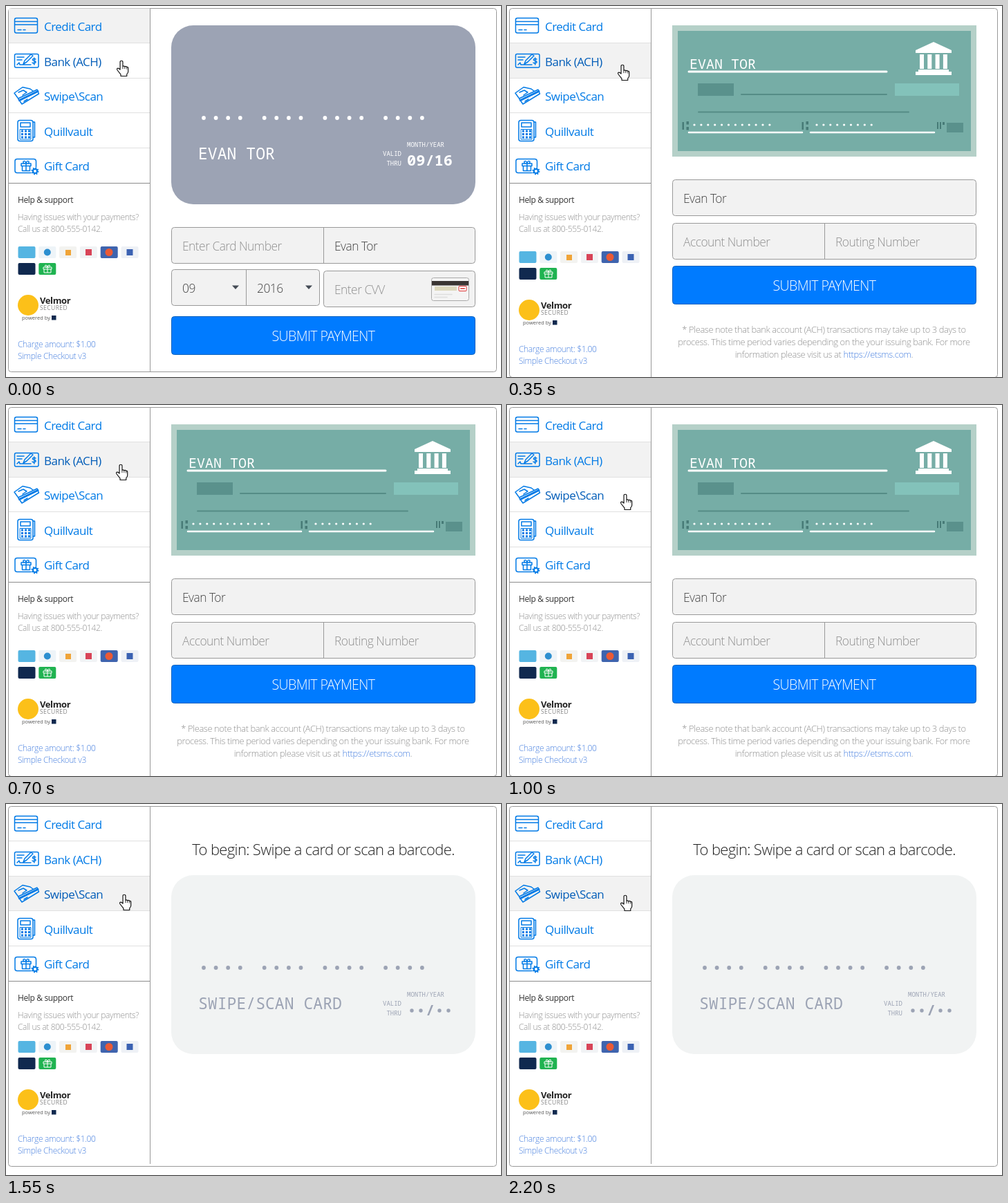
These frames come from a looping animation (716x537 px, 2250 ms). An HTML page:

```html
<!DOCTYPE html>
<html lang="en">
<head>
<meta charset="utf-8">
<title>Payment form</title>
<style>
  html, body { margin: 0; width: 100%; height: 100%; overflow: hidden; background: #fff; }
  svg { display: block; width: 716px; height: 537px; }
  text { font: 300 12px "Open Sans", "Noto Sans", sans-serif; letter-spacing: -.03em; fill: #909090; }
  .menu { font-size: 17px; font-weight: 400; fill: #007ae6; }
  .hover { fill: #005cb8; }
  .field { font-size: 17.4px; }
  .value { fill: #444; }
  .submit { font-size: 19.5px; fill: #fff; }
  .title { font-size: 22px; fill: #222; }
  .note { font-size: 12.9px; }
  .help { font-weight: 400; fill: #333; }
  .link { fill: #4c83e0; }
  .mid { text-anchor: middle; }
  .end { text-anchor: end; }
  .mono { font-family: "Noto Sans Mono", "DejaVu Sans Mono", monospace; font-weight: 500; letter-spacing: 0; fill: inherit; }
  .name { font-size: 23.1px; }
  .payer { font-size: 20px; }
  .tiny { font-size: 9px; }
  .date { font-size: 22px; font-weight: 700; }
  .brand { font-size: 13px; font-weight: 700; fill: #222; }
  .secured { font-size: 8.5px; font-weight: 400; letter-spacing: .05em; fill: #888; }
  .powered { font-size: 7.5px; font-weight: 400; letter-spacing: 0; fill: #555; }
  .icons { fill: none; stroke: #007ae6; stroke-width: 1.5; stroke-linejoin: round; stroke-linecap: round; }
</style>
</head>
<body>
<svg viewBox="0 0 716 537">
  <rect id="frame" x="3.5" y="3.5" width="706" rx="4" fill="#fff" stroke="#999"/>
  <rect id="active" x="4" width="204" height="50" fill="#f2f2f2"/>
  <path d="M4 53.5H208M4 104.5H208M4 154.5H208M4 205.5H208" stroke="#e0e0e0"/>
  <path d="M4 256.5H208" stroke="#8c8c8c"/>
  <path id="divider" stroke="#999"/>

  <g class="icons">
    <rect x="12.5" y="17.5" width="33" height="21.5" rx="2.5"/>
    <path d="M13 22.5H45M13 27H45M17 34.500H22M25 34.500H28"/>
    <rect x="12.5" y="69.5" width="34.5" height="19.5" rx="2"/>
    <path d="M16 74H26M16 78H23M16 85L19 82 20 85H36M25 84L27 79 36 70 39 72 30 81Z"/>
    <path d="M43 77Q38 75 38.5 78.5 43.5 79 43 82 40 84 38 82M40.8 75V85"/>
    <path d="M12 126L24 117.500 35 120 39 123M12 126L17 133M18 125L25 122 30 125 24 129"/>
    <path d="M17.500 134L45 121 47.500 127 23 142Z"/>
    <path d="M19.500 136.500L46 123.500" stroke-width="3"/>
    <path d="M26 138L31 135"/>
    <rect x="17" y="165.5" width="22" height="30" rx="3"/>
    <path d="M39 168H41.500V190H39"/>
    <rect x="21" y="169" width="14" height="6"/>
    <path d="M22 181H35M22 185.500H35M22 190H35" stroke-width="3" stroke-dasharray="3 2" stroke-linecap="butt"/>
    <path d="M20.5 178.5H36V193H20.5Z" stroke-width="1"/>
    <path d="M36 241.5H16Q13 241.5 13 238.5V224.5Q13 221.5 16 221.5H40Q43.5 221.5 43.5 225V233"/>
    <path d="M22 228H36V231.5H22ZM23.5 231.5V238.5H34.5V231.5M29 228V238.5M29 228Q24 228 25 225 28 223 29 228 30 223 33 225 34 228 29 228"/>
    <circle cx="42" cy="239" r="3" stroke-width="2"/>
    <circle cx="42" cy="239" r="4.5" stroke-width="2" stroke-dasharray="1.8 1.7" stroke-linecap="butt"/>
  </g>
  <g id="menu"></g>
  <g id="help"></g>
  <g id="support"></g>
  <g id="pages"></g>

  <g id="hand">
    <g transform="translate(-1 -.3) scale(.97 .95)" fill="#fff" stroke="#111" stroke-width="1.2" stroke-linejoin="round">
      <path d="M-2 13V1.5Q-2-.5 0-.5T2 1.5V8Q3.5 6.8 5 8.5 6.7 7.5 8 9.2 10 8.5 10 11V16Q10 18 8 20V23H-1V20.5L-6 14Q-7.5 11.5-5.5 11-4 10.5-2 13Z"/>
      <path d="M2 8V12M5 8.5V12M8 9.2V12.5" fill="none" stroke-width=".9"/>
    </g>
  </g>
  <path id="arrow" d="M0 0V15.5L3.6 12.2 6 18 8.5 17 6 11.4H10.8Z" fill="#fff" stroke="#111" stroke-linejoin="round"/>
</svg>
<script>
const $ = id => document.getElementById(id);
const text = (x, y, cls, s) => `<text x="${x}" y="${y}" class="${cls}">${s}</text>`;
const rect = (x, y, w, h, fill, rx = 0) =>
  `<rect x="${x}" y="${y}" width="${w}" height="${h}" rx="${rx}" fill="${fill}"/>`;
const circle = (x, y, r, fill) => `<circle cx="${x}" cy="${y}" r="${r}" fill="${fill}"/>`;
const line = (x1, x2, y, color, w) =>
  `<path d="M${x1} ${y}H${x2}" stroke="${color}" stroke-width="${w}" stroke-linecap="round"/>`;
const dots = (n, x, y, step, r, fill) =>
  Array.from({ length: n }, (_, i) => circle(x + i * step, y, r, fill)).join("");
const box = (x, y, w, split) =>
  `<rect x="${x}" y="${y}" width="${w}" height="52" rx="4" fill="#f2f2f2" stroke="#999"/>` +
  (split ? `<path d="M${split} ${y}v52" stroke="#999"/>` : "");
const caret = x => `<path d="M${x - 5} 404.5h10l-5 5.5z" fill="#444b55"/>`;
const submit = y =>
  `<rect x="239.5" y="${y + .5}" width="439" height="55" rx="4" fill="#007bff" stroke="#0a62bd"/>` +
  text(459, y + 36, "submit mid", "SUBMIT PAYMENT");

// Card face shared by the credit card and swipe pages
function card(y, back, ink, name, date) {
  let out = rect(239, y, 440, 259, back, 32);
  for (let g = 0; g < 4; g++) out += dots(4, 286 + g * 87.7, y + 134, 17.6, 2.9, ink);
  return out + `<g fill="${ink}">` + text(278, y + 194, "mono name", name) +
    text(580, y + 176, "mono tiny", "MONTH/YEAR") +
    text(572, y + 189, "mono tiny end", "VALID") +
    text(572, y + 203, "mono tiny end", "THRU") + date + "</g>";
}

function bankIcon() {
  let out = `<path d="M591 64L617 52 643 64V68H591ZM595 92H639V95H643V100H591V95H595Z" fill="#fff"/>`;
  for (let i = 0; i < 4; i++) out += rect(597 + i * 11.3, 70, 6, 21, "#fff");
  return out;
}

const micr = x => rect(x, 168, 2.5, 11, "#477b77") +
  rect(x + 6, 167, 3.5, 4.5, "#477b77") + rect(x + 6, 175, 3.5, 4.5, "#477b77");

const creditPage = card(28, "#9ca3b4", "#fff", "EVAN TOR", text(580, 231, "mono date", "09/16")) +
  box(239.5, 320.5, 439, 459.5) +
  text(255, 354, "field", "Enter Card Number") + text(475, 354, "field value", "Evan Tor") +
  box(239.5, 381.5, 214, 347.5) +
  text(255, 415, "field value", "09") + text(363, 415, "field value", "2016") + caret(332) + caret(438) +
  box(459.5, 383.5, 219) + text(475, 417, "field", "Enter CVV") +
  `<rect x="615.5" y="393.5" width="54" height="33" rx="3" fill="#f4f4f4" stroke="#aaa"/>` +
  rect(616, 398, 53, 6.5, "#3a3533") + rect(620, 406, 32, 6, "#ddd8bd") +
  `<rect x="655" y="405.5" width="11" height="7" rx="1" fill="#fff" stroke="#d33"/>` +
  line(658, 663, 409, "#d66", 2) + line(620, 645, 417.5, "#ddd", 1.5) + line(620, 638, 421.5, "#ddd", 1.5) +
  submit(449);

const checkPage = rect(239, 28, 440, 190, "#b5d0c8") + rect(247, 36, 424, 174, "#76ada6") + bankIcon() +
  `<g fill="#fff">${text(264, 91, "mono payer", "EVAN TOR")}</g>` +
  line(263, 549, 95, "#fff", 3) +
  rect(276, 112, 52, 18, "#5a918c") + line(339, 549, 128, "#558c86", 2) +
  rect(561, 112, 93, 18, "#83c2ba") + line(277, 581, 153.5, "#558c86", 2) +
  micr(253.5) + micr(426.5) +
  rect(622, 168, 2, 10, "#477b77") + rect(626, 168, 2, 10, "#477b77") + rect(630, 168, 3, 4, "#477b77") +
  rect(636, 169, 24, 14, "#5a918c") +
  dots(12, 271, 172, 9.9, 1.6, "#fff") + dots(9, 448, 172, 9.9, 1.6, "#fff") +
  line(263, 427, 183, "#fff", 2.5) + line(439, 618, 183, "#fff", 2.5) +
  box(239.5, 251.5, 439) + text(255, 285, "field value", "Evan Tor") +
  box(239.5, 314.5, 439, 459.5) +
  text(255, 348, "field", "Account Number") + text(475, 348, "field", "Routing Number") +
  submit(376) +
  text(458.5, 473, "note mid", "* Please note that bank account (ACH) transactions may take up to 3 days to") +
  text(458.5, 491, "note mid", "process. This time period varies depending on the your issuing bank. For more") +
  text(458.5, 509, "note mid", `information please visit us at <tspan class="link">https://etsms.com</tspan>.`);

const swipePage = text(459, 74, "title mid", "To begin: Swipe a card or scan a barcode.") +
  card(103, "#f1f3f3", "#9ca3b4", "SWIPE/SCAN CARD",
    dots(2, 587, 299, 13, 2.7, "#9ca3b4") + text(607, 306, "mono date", "/") +
    dots(2, 627, 299, 13, 2.7, "#9ca3b4"));

$("pages").innerHTML = [creditPage, checkPage, swipePage].map(p => `<g>${p}</g>`).join("");

$("menu").innerHTML = ["Credit Card", "Bank (ACH)", "Swipe\\Scan", "Quillvault", "Gift Card"]
  .map((s, i) => text(55, 36 + Math.round(i * 50.5), "menu", s)).join("");

$("help").innerHTML = text(17, 285, "help", "Help &amp; support") +
  text(17, 310, "", "Having issues with your payments?") + text(17, 327, "", "Call us at 800-555-0142.");

const tile = (i, fill, y = 348) => rect(17.5 + i * 29.8, y, 25, 17, fill, 2);
$("support").innerHTML =
  tile(0, "#55b5e2") + tile(1, "#eef4f8") + circle(59.8, 356.5, 5, "#2d8fd0") +
  tile(2, "#f3f3f0") + rect(86, 353, 8, 8, "#f0a437") +
  tile(3, "#f1f3f5") + rect(115, 352, 9, 9, "#d84458") +
  tile(4, "#3f64ae") + circle(149, 356.5, 5.5, "#eb5a35") +
  tile(5, "#eef1f6") + rect(174.5, 352, 9, 9, "#3b62b2") +
  tile(0, "#10294f", 372) + tile(1, "#20b351", 372) +
  `<path d="M54 378h12v3h-12zM55 381v5h10v-5M60 378v8M60 378q-5 0-3-3 3 0 3 3 0-3 3-3 2 3-3 3" fill="none" stroke="#fff"/>` +
  circle(32, 433, 15, "#fcc019") +
  text(49, 431, "brand", "Velmor") + text(49, 440, "secured", "SECURED") +
  text(23, 454, "powered", "powered by") + rect(66, 448, 6.5, 6.5, "#10294f") +
  text(17, 494, "link", "Charge amount: $1.00") + text(17, 511, "link", "Simple Checkout v3");

const LOOP = 2250, STEP = 50;
const layouts = [
  { shift: 0, bottom: 529.5, row: 3.5 },
  { shift: 7, bottom: 537.5, row: 54 },
  { shift: -5, bottom: 524.5, row: 105 },
];
// Pointer tip: time, x, y
const path = [[0, 168, 80], [250, 167, 86], [350, 168, 86], [550, 168, 86],
  [700, 167, 87], [1050, 172, 132], [2050, 172, 132], [2200, 172, 133], [LOOP, 172, 133]];

function pointer(t) {
  const i = path.findIndex(p => p[0] > t);
  const [t0, x0, y0] = path[i - 1], [t1, x1, y1] = path[i];
  const k = (t - t0) / (t1 - t0), e = k * k * (3 - 2 * k);
  return [x0 + (x1 - x0) * e, y0 + (y1 - y0) * e].map(Math.round);
}

function draw(now) {
  const t = Math.floor(now % LOOP / STEP) * STEP;
  const page = t < 350 ? 0 : t < 1550 ? 1 : 2;
  const { shift, bottom, row } = layouts[page];
  const [x, y] = pointer(t);
  const clicking = t >= 250 && t < 350;

  [...$("pages").children].forEach((g, i) => g.style.display = i === page ? "" : "none");
  [...$("menu").children].forEach((s, i) => s.classList.toggle("hover", i === (y < 104 ? 1 : 2)));
  $("frame").setAttribute("height", bottom - 3.5);
  $("divider").setAttribute("d", `M208.5 4V${page === 2 ? 521 : bottom}`);
  $("active").setAttribute("y", row);
  $("support").setAttribute("transform", `translate(0 ${shift})`);
  for (const id of ["hand", "arrow"]) {
    $(id).setAttribute("transform", `translate(${x} ${y})`);
    $(id).style.display = (id === "arrow") === clicking ? "" : "none";
  }
}

const start = performance.now();
(function tick() {
  draw(performance.now() - start);
  requestAnimationFrame(tick);
})();
</script>
</body>
</html>
```
